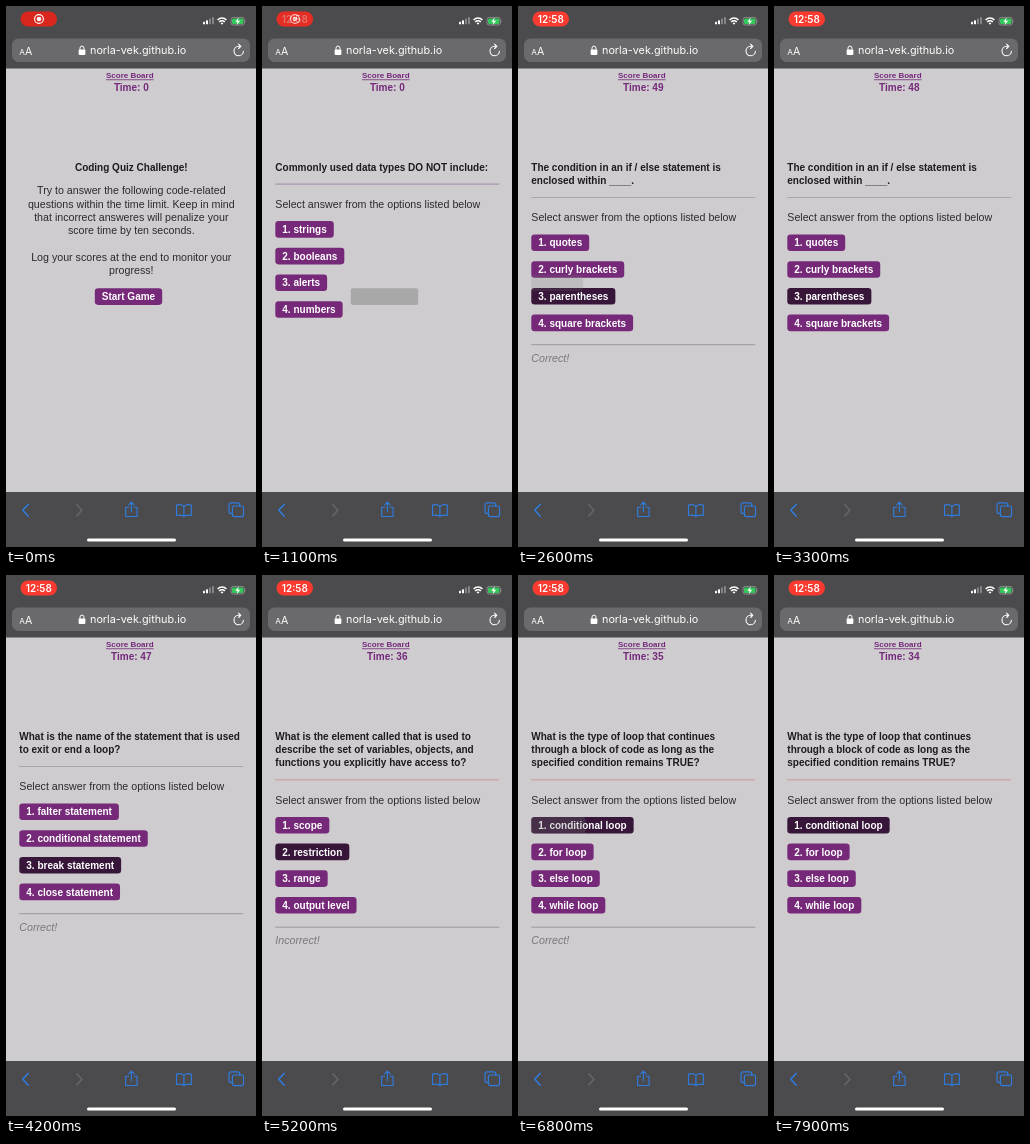
These frames come from a looping animation (250x541 px, 8 s). An HTML page:

```html
<!DOCTYPE html>
<html lang="en">
<head>
<meta charset="utf-8">
<title>Coding Quiz</title>
<style>
  html, body { margin: 0; width: 100%; height: 100%; overflow: hidden; background: #cfcccf; }
  svg { display: block; width: 250px; height: 541px; }
  text { font: 10.667px "Liberation Sans", Arial, sans-serif; fill: #2b2a2c; white-space: pre; }
  .b { font-weight: bold; font-size: 10px; fill: #1d1b1e; }
  .mid { text-anchor: middle; }
  .purple { font-weight: bold; font-size: 10px; fill: #74297a; }
  .link { font-size: 8px; text-decoration: underline; }
  .label { font-weight: bold; font-size: 10px; fill: #fff; }
  .note { font-style: italic; fill: #79777a; }
  .ui { font-family: Inter, Roboto, sans-serif; fill: #fff; }
  .line { fill: none; stroke-linecap: round; stroke-linejoin: round; }
  .blue { stroke: #2f7ce0; stroke-width: 1.15; }
</style>
</head>
<body>
<svg viewBox="0 0 250 541">
  <rect width="250" height="541" fill="#cfcccf"/>
  <g id="page"></g>
  <rect id="flash" rx="2" fill="#737573"/>

  <!-- top bar -->
  <rect width="250" height="62.5" fill="#4b4a4c"/>
  <rect x="6" y="32.5" width="238" height="23.5" rx="6.5" fill="#6a696b"/>
  <g id="rec">
    <rect x="14.5" y="5.5" width="36.5" height="15" rx="7.5" fill="#d9271e"/>
    <circle cx="33" cy="13" r="4.4" fill="none" stroke="#fff" stroke-width="1.1"/>
    <circle cx="33" cy="13" r="2.3" fill="#fff"/>
  </g>
  <g id="clock">
    <rect x="14.5" y="5.5" width="36.5" height="15" rx="7.5" fill="#fb3a30"/>
    <text class="ui mid" x="32.8" y="16.7" style="font-size:10px;font-weight:600">12:58</text>
  </g>
  <g fill="#fff">
    <rect x="197" y="15.7" width="2" height="2.6" rx=".5"/>
    <rect x="200" y="14.3" width="2" height="4" rx=".5"/>
    <rect x="203" y="12.6" width="2" height="5.7" rx=".5" fill="#858486"/>
    <rect x="206" y="11" width="2" height="7.3" rx=".5" fill="#858486"/>
  </g>
  <g class="line" stroke="#fff" stroke-width="1.5" style="stroke-linecap:butt">
    <path d="M211.6 14a6 6 0 0 1 8.8 0M213.2 16a3.8 3.8 0 0 1 5.6 0"/>
  </g>
  <path d="M214.6 17.2a2 2 0 0 1 2.8 0L216 18.8z" fill="#fff"/>
  <rect x="225" y="11.4" width="13.4" height="7.6" rx="2.2" fill="none" stroke="#a5a5a6" stroke-width=".7"/>
  <rect x="226" y="12.4" width="11.4" height="5.6" rx="1.3" fill="#35c759"/>
  <path d="M239.4 13.9q1 1.3 0 2.6z" fill="#a5a5a6"/>
  <path d="M232.8 11.2l-3.4 4.5h2.1l-.9 3.7 3.5-4.7h-2.2z" fill="#fff"/>
  <text class="ui" x="13.2" y="48.6" style="font-size:8.2px">A</text>
  <text class="ui" x="19" y="48.6" style="font-size:10.6px">A</text>
  <rect x="72.6" y="43.6" width="6.8" height="5.4" rx="1" fill="#fff"/>
  <path class="line" d="M74 43.8v-1.7a2 2 0 0 1 4 0v1.7" stroke="#fff" stroke-width="1"/>
  <text class="ui" x="84" y="48.3" style="font-size:10.8px">norla-vek.github.io</text>
  <path class="line" d="M237.4 45.2a4.7 4.7 0 1 1-4.7-4.9h1.8M232.6 38.2l2.2 2.1-2.2 2.2" stroke="#fff" stroke-width="1.1"/>

  <!-- bottom bar -->
  <rect y="486" width="250" height="55" fill="#4b4a4c"/>
  <g class="line blue">
    <path d="M22.3 498.3l-5.6 6 5.6 6" stroke-width="1.5"/>
    <path d="M70.9 498.8l5 5.5-5 5.5" stroke="#69686a" stroke-width="1.4"/>
    <path d="M122.6 501.2h-2.9v9.3h11.4v-9.3h-2.9M125.4 506v-9.6M122.7 498.9l2.7-2.7 2.7 2.7"/>
    <path d="M177.9 500.3q-3.2-2.4-7.4-1.2v10.4q4.2-1.1 7.4 1 3.2-2.1 7.4-1v-10.4q-4.2-1.2-7.4 1.2zv10.2"/>
    <path d="M226.2 507.4h-1.2a2 2 0 0 1-2-2v-6.6a2 2 0 0 1 2-2h6.8a2 2 0 0 1 2 2v1.2"/>
    <rect x="226.4" y="500" width="11.2" height="10.6" rx="2"/>
  </g>
  <rect x="81" y="532.6" width="89" height="3" rx="1.5" fill="#fff"/>
</svg>
<script>
const LOOP = 8000, NOTE_MS = 850, FLASH_MS = 320;
const LINE = 13.4, STEP = 26.7;
const $ = id => document.getElementById(id);
const page = $('page'), flash = $('flash');

const intro = [
  [184.5, 'Try to answer the following code-related'],
  [197.9, 'questions within the time limit. Keep in mind'],
  [211.2, 'that incorrect answeres will penalize your'],
  [224.6, 'score time by ten seconds.'],
  [251.2, 'Log your scores at the end to monitor your'],
  [264.6, 'progress!']
];

// at: when it appears, hot: option left highlighted by the last tap
const quiz = [
  { at: 1050, hot: -1, rule: '#9a7ea1', note: '',
    title: ['Commonly used data types DO NOT include:'],
    options: ['strings', 'booleans', 'alerts', 'numbers'] },
  { at: 2400, hot: 2, rule: '#a4a2a6', note: 'Correct!',
    title: ['The condition in an if / else statement is', 'enclosed within ____.'],
    options: ['quotes', 'curly brackets', 'parentheses', 'square brackets'] },
  { at: 3750, hot: 2, rule: '#a4a2a6', note: 'Correct!',
    title: ['What is the name of the statement that is used', 'to exit or end a loop?'],
    options: ['falter statement', 'conditional statement', 'break statement', 'close statement'] },
  { at: 4850, hot: 1, rule: '#cc9090', note: 'Incorrect!',
    title: ['What is the element called that is used to', 'describe the set of variables, objects, and', 'functions you explicitly have access to?'],
    options: ['scope', 'restriction', 'range', 'output level'] },
  { at: 6650, hot: 0, rule: '#cc9090', note: 'Correct!',
    title: ['What is the type of loop that continues', 'through a block of code as long as the', 'specified condition remains TRUE?'],
    options: ['conditional loop', 'for loop', 'else loop', 'while loop'] }
];

const ticks = [[0, 0], [2050, 49], [3050, 48], [4050, 47], [5050, 36], [6050, 35], [7050, 34]];

function add(tag, attrs, content = '') {
  const el = document.createElementNS('http://www.w3.org/2000/svg', tag);
  for (const k in attrs) el.setAttribute(k, attrs[k]);
  el.textContent = content;
  return page.appendChild(el);
}

const text = (x, cy, cls, s) => add('text', { x, y: cy + 3.6, class: cls }, s);
const rule = (y, fill) => add('rect', { x: 13.3, y: y - .4, width: 224, height: .9, fill });

// x is the left edge, or the centre when centred
function button(x, cy, label, hot, centred) {
  const box = add('rect', { y: cy - 8.3, height: 16.6, rx: 3.3, fill: hot ? '#37163a' : '#762979' });
  const el = text(x, cy, 'label', label);
  const w = el.getComputedTextLength() + 14;
  const left = centred ? x - w / 2 : x;
  el.setAttribute('x', left + 7);
  box.setAttribute('x', left);
  box.setAttribute('width', w);
  return { x: left, y: cy - 8.3, width: w, height: 16.6 };
}

function drawIntro() {
  text(125.3, 161, 'b mid', 'Coding Quiz Challenge!');
  for (const [y, s] of intro) text(125.3, y, 'mid', s);
  return [button(122.5, 290.6, 'Start Game', false, true)];
}

function drawQuestion(q, showNote) {
  const shift = LINE * (q.title.length - 1);
  q.title.forEach((s, i) => text(13.3, 161 + LINE * i, 'b', s));
  rule(178 + shift, q.rule);
  text(13.3, 198.3 + shift, '', 'Select answer from the options listed below');
  const boxes = q.options.map((s, i) =>
    button(13.3, 223.4 + shift + STEP * i, `${i + 1}. ${s}`, i === q.hot));
  if (showNote) {
    rule(325.3 + shift, '#94929b');
    text(13.3, 339 + shift, 'note', q.note);
  }
  return boxes;
}

function drawScreen(i, showNote, time) {
  page.textContent = '';
  text(123.8, 68.8, 'purple link mid', 'Score Board');
  text(125.3, 81.4, 'purple mid', 'Time: ' + time);
  return i < 0 ? drawIntro() : drawQuestion(quiz[i], showNote);
}

// the box that was tapped to reach each question
const tapped = quiz.map((q, i) => drawScreen(i - 1, false, 0)[Math.max(q.hot, 0)]);

let shown = '';
function render(t) {
  const i = quiz.filter(q => t >= q.at).length - 1;
  const age = i < 0 ? Infinity : t - quiz[i].at;
  const showNote = i > 0 && age < NOTE_MS;
  const time = ticks.filter(k => t >= k[0]).pop()[1];
  const key = [i, showNote, time].join();
  if (key !== shown) {
    drawScreen(i, showNote, time);
    shown = key;
    if (i >= 0) for (const k in tapped[i]) flash.setAttribute(k, tapped[i][k]);
  }
  flash.setAttribute('opacity', .5 * Math.max(0, 1 - age / FLASH_MS));
  const swap = Math.min(1, Math.max(0, (t - 1000) / 300));
  $('rec').setAttribute('opacity', swap < 1 ? 1 : 0);
  $('clock').setAttribute('opacity', swap);
}

const start = performance.now();
function frame() {
  render((performance.now() - start) % LOOP);
  requestAnimationFrame(frame);
}
frame();
</script>
</body>
</html>
```
